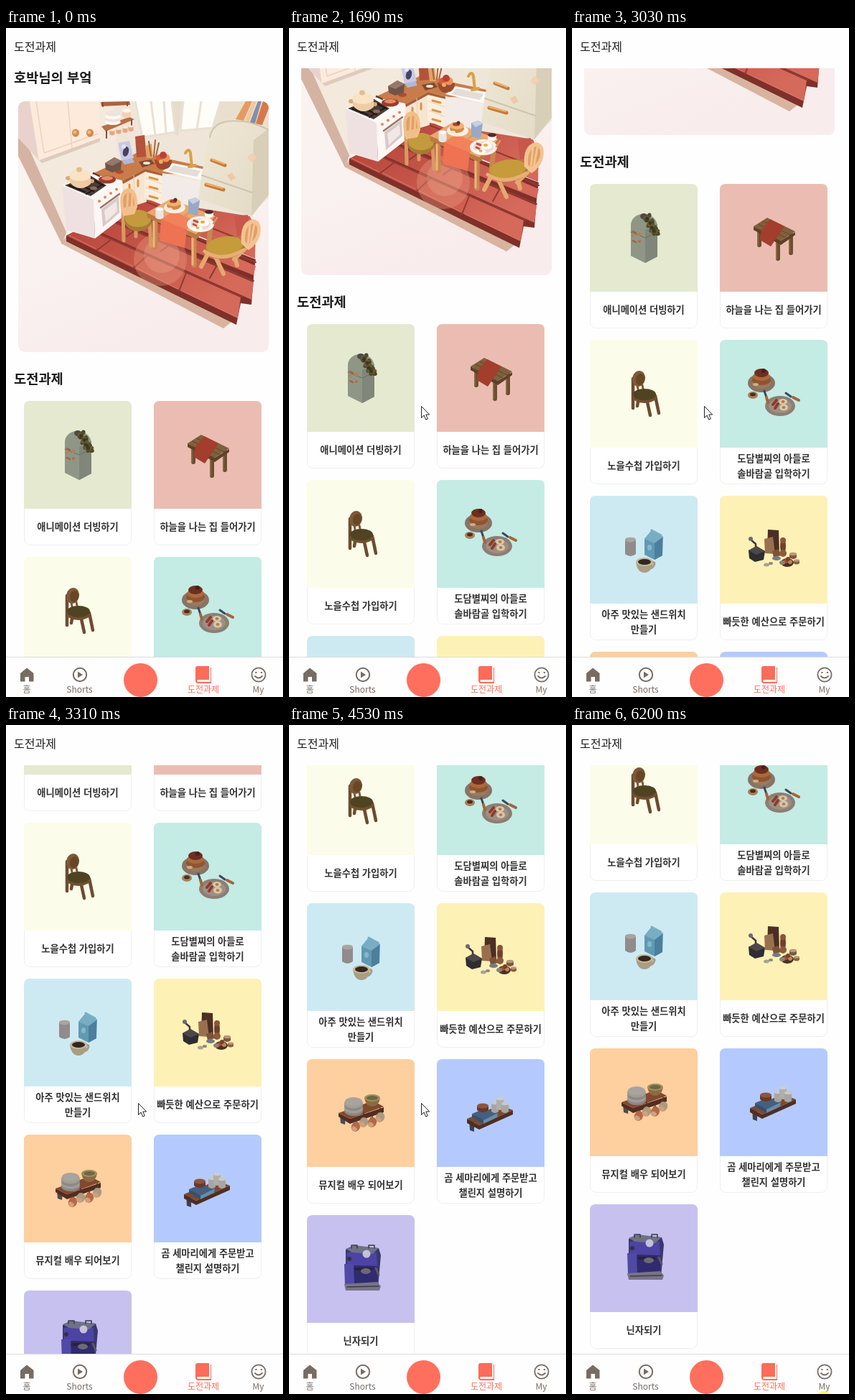
Animation, 386 px wide and 931 px high, one loop 6270 ms. Source, as an HTML page:

```html
<!DOCTYPE html>
<html lang="ko">
<head>
<meta charset="utf-8">
<title>도전과제</title>
<style>
html, body { margin: 0; width: 100%; height: 100%; overflow: hidden; background: #fefefe; }
svg { display: block; width: 386px; height: 931px; }
text { font-family: "Noto Sans CJK KR", "Noto Sans KR", "Noto Sans CJK", "Noto Sans", sans-serif; fill: #1d1d1d; }
.head { font-size: 16px; font-weight: 500; }
.title { font-size: 18.72px; font-weight: 700; }
.label { font-size: 13.28px; font-weight: 600; fill: #333; text-anchor: middle; }
.tab { font-size: 12px; fill: #776c64; text-anchor: middle; }
.tab.on { fill: #fb6c59; }
</style>
</head>
<body>
<svg viewBox="0 0 386 931">
  <defs>
    <clipPath id="view"><rect y="56" width="386" height="819"/></clipPath>
    <clipPath id="photo"><rect x="17" y="102" width="349" height="349" rx="9"/></clipPath>
    <linearGradient id="haze" x2=".4" y2="1">
      <stop stop-color="#fbf3ee"/><stop offset=".6" stop-color="#faf2f0"/><stop offset="1" stop-color="#f8ecec"/>
    </linearGradient>
    <linearGradient id="tile" x2="1" y2=".6"><stop stop-color="#b8463c"/><stop offset="1" stop-color="#d5695a"/></linearGradient>
    <linearGradient id="cool" x2="1" y2="1"><stop stop-color="#efe8d6"/><stop offset="1" stop-color="#e2dac4"/></linearGradient>
  </defs>
  <rect width="386" height="931" fill="#fefefe"/>
  <g clip-path="url(#view)"><g id="page">
    <text class="title" x="11" y="76">호박님의 부엌</text>
    <g id="kitchen" clip-path="url(#photo)"></g>
    <text class="title" x="11" y="495">도전과제</text>
    <g id="cards"></g>
  </g></g>
  <text class="head" x="11" y="32">도전과제</text>
  <g id="nav">
    <path d="M0 875.5H386" stroke="#dcdcdc"/>
    <path d="M20 898l9-7.500 9.500 7.500v11.500h-6.500v-6.500h-5.500v6.500H20z" fill="#776c64"/>
    <circle cx="103" cy="900" r="9.200" fill="none" stroke="#776c64" stroke-width="2"/>
    <path d="M100 895.500v9l7-4.500z" fill="#776c64"/>
    <circle cx="187.500" cy="907.500" r="23.500" fill="#ff6f5e"/>
    <path d="M267 888h16v19h-16q-1.500 1.500 0 3h18v-20h1v22h-19q-3-1-3-4v-17q0-3 3-3z" fill="#fb6c59"/>
    <g fill="none" stroke="#776c64" stroke-width="1.800" stroke-linecap="round">
      <circle cx="352" cy="900" r="9.600"/><path d="M347 902q5 5 10 0M348 897h.8M355.500 897h.8"/>
    </g>
    <text class="tab" x="29" y="925">홈</text>
    <text class="tab" x="102.500" y="925">Shorts</text>
    <text class="tab on" x="275" y="925">도전과제</text>
    <text class="tab" x="351.500" y="925">My</text>
  </g>
  <ellipse id="glow" cx="351" cy="934" rx="9.500" ry="7" fill="#fbf75f" opacity="0"/>
  <path id="cursor" d="M.5 .5v16l3.700-3.500 2.500 6 2.600-1.100-2.500-5.900h4.900z" fill="#fff" stroke="#222" opacity="0"/>
</svg>
<script>
const LOOP = 6270;
const $ = id => document.getElementById(id);

// Shape helpers, all returning SVG markup
const P = (fill, pts) => `<polygon fill="${fill}" points="${pts}"/>`;
const E = (fill, x, y, rx, ry = rx, turn = 0) =>
  `<ellipse fill="${fill}" cx="${x}" cy="${y}" rx="${rx}" ry="${ry}" transform="rotate(${turn} ${x} ${y})"/>`;
const L = (color, width, d) =>
  `<path d="${d}" fill="none" stroke="${color}" stroke-width="${width}" stroke-linecap="round" stroke-linejoin="round"/>`;
const D = (fill, d) => `<path fill="${fill}" d="${d}"/>`;
const cup = (body, top, x, y, r, h) =>
  D(body, `M${x - r} ${y}v${h}q${r} ${r * .8} ${2 * r} 0v${-h}z`) + E(top, x, y, r, r * .45);

const room = () => [
  '<rect x="17" y="102" width="349" height="349" fill="url(#haze)"/>',
  P('#d4b3a2', '17,132 85,282 78,301 17,178'),
  P('#f3e9dc', '17,102 160,102 170,230 84,284 17,134'),
  P('#efe6d9', '150,102 366,102 366,236 330,268 160,240'),
  P('#e6dccb', '232,102 246,102 240,150 232,146'),
  P('#e9dfcd', '300,102 366,102 366,150 282,150'),
  // wall cupboard
  P('#ead2cc', '17,102 33,102 46,184 17,153'),
  P('#fdeadb', '33,102 130,102 131,153 46,184'),
  P('#dfcbbd', '46,184 131,153 131,158 50,188'),
  L('#ead3c2', 1.5, 'M86 102L92 167M42 102L53 174L128 147'),
  E('#d98a47', 97, 146, 5, 5.5), E('#d98a47', 117, 146, 5, 5.5),
  E('#f2b878', 96, 145, 2.5), E('#f2b878', 116, 145, 2.5),
  // windows
  P('#fffdf8', '178,102 231,102 236,144 190,152'),
  P('#fffdf8', '247,102 299,102 288,139 243,143'),
  L('#e9e0d4', 3, 'M202 102L208 149M220 102L223 146M180 102L190 152L236 145L231 102'),
  L('#e9e0d4', 3, 'M272 102L266 141M247 102L243 143L288 139L299 102'),
  // plate shelves
  P('#a9643e', '132,103 172,102 173,107 133,109'),
  P('#b86f45', '133,137 172,124 179,127 139,144'),
  L('#85503a', 2, 'M135 109v-5M140 143v10M175 128v8M169 104v4'),
  [0, 1, 2, 3].map(i => E(i % 2 ? '#f0e2dc' : '#fffaf5', 149, 131 - i * 4, 11, 4)).join(''),
  cup('#f1d0b8', '#fff5ea', 168, 115, 6, 8),
  [148, 157, 166, 174].map(x => cup('#e6a684', '#fbe7d5', x, 142 - (x - 148) / 5, 3.5, 6)).join('')
].join('');

const floor = () => [
  P('#d8b3a0', '77,300 85,288 318,406 303,418'),
  P('#7f3028', '84,289 162,250 348,322 346,335 342,385 327,383 321,413 84,297'),
  P('url(#tile)', '84,289 107,277 327,375 323,404'),
  P('url(#tile)', '111,275 134,264 345,354 342,378'),
  P('url(#tile)', '138,262 161,250 348,331 345,344'),
  P('url(#tile)', '165,248 190,238 340,262 348,280 347,321'),
  L('#913a31', 2, 'M108 277L329 374M135 263L345 352M162 249L348 326M190 240L346 302'),
  L('#913a31', 2, 'M127 309L147 294M178 334L196 317M241 366L251 341'),
  L('#913a31', 2, 'M168 290L185 278M215 311L232 299M284 348L294 330M240 290L262 276M310 318L322 303'),
  L('#d97b69', 1, 'M87 288L125 307M131 309L176 331M182 334L239 363M245 366L321 402'),
  P('#c7584b', '318,262 337,260 341,286 322,290'),
  '<circle cx="215" cy="322" r="37" fill="#ed9d82" opacity=".35"/>',
  '<circle cx="217" cy="316" r="25" fill="#f2b69a" opacity=".25"/>'
].join('');

const units = () => [
  // counter and cabinets
  P('#f6e5d2', '160,212 193,194 196,242 163,252'),
  P('#fbeedd', '193,194 219,202 217,246 193,236'),
  P('#c97b49', '116,205 184,173 280,194 276,204 219,203 194,196 162,213'),
  P('#a85f38', '162,213 194,196 219,203 219,206 194,200 163,217'),
  L('#e5cfb9', 1, 'M178 205L180 246M195 209L217 217M195 222L217 230'),
  L('#dd9547', 3, 'M200 208l11 3M200 221l11 3M200 234l11 3M172 218v8M184 212v8'),
  // sink and tap
  P('#fdf9f5', '218,199 232,188 279,197 272,212'),
  P('#e5dcd7', '226,199 234,191 271,199 266,207'),
  P('#f2ebe7', '218,202 272,213 270,243 217,246'),
  L('#dba045', 4, 'M259 193L257 174Q255 166 250 174M255 193l9-2'),
  // fridge
  D('url(#cool)', 'M272 208L282 154Q286 132 310 128Q338 122 366 138V232L342 262L268 238Z'),
  D('#d8cfb9', 'M345 156L366 140V232L342 262Z'),
  L('#cfc5ae', 2, 'M273 205L343 229M366 142Q338 126 308 130Q288 133 284 152'),
  L('#c87a3a', 5, 'M287 184L305 191M279 218L303 225'),
  L('#f0b165', 2, 'M287 183L304 189M279 217L302 223'),
  P('#f5cfae', '336,181 342,174 349,180 343,187'), P('#f0c9a6', '308,205 315,201 320,209 313,213'),
  // books
  P('#e59a63', '320,127 334,102 343,102 331,129'), P('#f4c79e', '333,129 344,102 349,102 339,131'),
  P('#7f8fae', '340,131 351,102 356,102 347,133'), P('#d9774a', '348,133 358,102 366,102 366,112 357,135'),
  // cooker
  P('#efe1e2', '78,219 122,239 124,293 84,281'),
  P('#fcf6f4', '122,239 162,212 164,262 124,293'),
  P('#fff9f6', '78,219 118,203 162,212 122,239'),
  P('#d8c9c7', '133,252 157,234 158,257 135,277'), P('#f1e7e4', '137,254 154,241 155,255 139,270'),
  L('#9a7563', 2.5, 'M132 250L158 231'),
  [0, 1, 2, 3].map(i => E('#d98b5b', 130 + i * 8, 241 - i * 5.5, 2)).join(''),
  P('#4a3b37', '82,219 117,205 140,219 118,234'),
  L('#1f1917', 2, 'M88 219l22 9M96 215l26 12M112 207l24 12M112 231l22-13M100 225l24-13'),
  E('#8c6c5a', 122, 223, 5, 2.5),
  // pot
  E('#d9ab79', 87, 209, 4, 3), E('#d9ab79', 119, 213, 4, 3),
  D('#efcda4', 'M89 205v10q13 15 29 2v-11z'), E('#f9e3c4', 103, 205, 15, 8), E('#e6bd8e', 102, 197, 4, 3.5),
  // worktop things
  E('#9b3c2d', 141, 211, 12, 5.5), E('#e58b65', 141, 209, 8, 3), L('#5a3c32', 2.5, 'M130 206l-8-4'),
  E('#b04a35', 158, 200, 6, 3),
  P('#6f5548', '138,188 151,180 161,185 160,197 148,201 139,197'), P('#94796a', '138,188 151,180 161,185 148,192'),
  P('#c9c9e4', '156,160 172,157 178,181 161,185'), E('#45435e', 167, 172, 4, 7, 15), E('#e8e2ef', 164, 165, 3),
  P('#aeb9dc', '162,185 176,181 179,187 165,190'),
  P('#b5523c', '180,151 193,149 196,179 182,180'), P('#e0a368', '194,164 203,161 205,181 196,181'),
  L('#a86538', 2, 'M202 178l-3-20M206 178l2-22M209 178l4-18'),
  P('#7f4a31', '185,186 202,183 207,189 190,194'), E('#efe6d6', 196, 188, 5, 2),
  D('#9e4a30', 'M207 183q2 15 12 14q12-1 12-13z'), E('#d85a3c', 214, 181, 5), E('#ee9355', 223, 181, 5.5), E('#b9403a', 219, 177, 5), E('#dfb35b', 216, 186, 3)
].join('');

const dining = () => [
  // left chair
  L('#d89a63', 5, 'M163 254L164 296M181 270L181 290M200 270L202 303'),
  E('#a87a35', 184, 268, 19, 15), E('#c39a3d', 184, 265, 18, 12),
  D('#f2bf8a', 'M160 252Q156 224 171 223Q184 224 183 249L179 259L163 262Z'),
  D('#dfa068', 'M164 250Q161 230 171 229Q179 230 179 247Z'),
  L('#f2bf8a', 3, 'M170 230L168 259M176 232L175 257'),
  // table
  L('#c9864e', 7, 'M208 266L208 305M286 268L282 306M262 290L262 330'),
  L('#eeb57a', 3, 'M206 266L206 304M260 290L260 329'),
  P('#bd7842', '196,257 265,286 291,264 291,270 265,294 197,264'),
  P('#e7a970', '196,257 229,238 292,262 265,287'),
  P('#f3815c', '216,266 233,255 262,267 252,280'), P('#ef7252', '216,266 252,280 249,306 214,296'),
  // breakfast
  E('#fbeee3', 235, 250, 15, 8), E('#d58a45', 234, 247, 10, 6), E('#eeb471', 234, 243, 10, 5),
  E('#a9442e', 233, 241, 5, 2.5), E('#5b3024', 236, 239, 2.5), E('#f8e5d0', 228, 252, 4, 2),
  P('#99a8c7', '254,239 264,236 270,240 267,261 254,258'), P('#c6d0e2', '254,239 264,236 270,240 260,245'),
  cup('#ece4e2', '#fffaf8', 214, 252, 5.5, 12),
  E('#fbf0eb', 271, 273, 19, 11), E('#e9d9d4', 271, 273, 14, 8), E('#fffdf5', 275, 271, 8, 5), E('#f3ad42', 274, 270, 3, 2.2),
  E('#fffdf5', 267, 279, 7, 4), E('#f3ad42', 267, 278, 2.5, 2), L('#c4513c', 3, 'M262 268l5 2M261 273l4 2'),
  cup('#fff5ed', '#4b2f28', 283, 256, 6, 6), L('#e0955f', 2.5, 'M248 262l7-5M289 272l5-8'),
  // right chair
  L('#e5a86e', 6, 'M285 307L272 332M317 312L322 330M288 310L303 342M340 300L318 322'),
  E('#a97b31', 306, 307, 27, 14, -8), E('#c59b3b', 305, 303, 26, 13, -8),
  L('#e8ae76', 5, 'M277 311Q300 327 331 309'),
  D('#f4c391', 'M328 300Q325 270 344 266Q358 268 354 288Q350 302 338 309Z'),
  D('#df9f67', 'M333 297Q332 276 344 272Q353 274 349 288Q345 297 337 302Z'),
  L('#f4c391', 3, 'M340 274L337 302M346 274L341 300')
].join('');

const props = {
  fridge: () => D('#8f9685', 'M57 58Q57 44 75 41Q92 44 94 58V101L77 110L57 100Z')
    + D('#80867a', 'M77 64L94 56V101L77 110Z') + L('#6b7066', 1, 'M57 67L77 75L94 67')
    + L('#a85f3c', 2.5, 'M60 66l4 2M60 79l4 2') + E('#c47a4e', 60, 72, 2) + E('#c47a4e', 69, 70, 2.5) + E('#b56b46', 69, 80, 2)
    + E('#4b4a4c', 75, 45, 5, 4)
    + [...Array(34)].map((_, i) => E(['#4e4c28', '#6a5930', '#3a3824'][i % 3], 78 + i * .46 + 4 * Math.sin(i * 7), 44 + i * .78 + 3 * Math.cos(i * 5), 2.6)).join(''),
  table: () => L('#6c4e31', 6, 'M55 64V85M81 80V104M99 70V96') + L('#8a6742', 2, 'M53 64V85M79 80V104M97 70V96')
    + P('#5d4129', '47,59 85,79 105,67 105,71 85,85 47,64') + P('#80603c', '47,59 66,47 105,66 85,79')
    + L('#5f4630', 1, 'M60 52L98 71M54 56L92 75') + P('#a33d2d', '70,49 90,59 71,87 56,78 58,64'),
  chair: () => L('#6d4b30', 4.5, 'M60 54V95M79 82L84 105M91 78L96 102M68 80L66 92')
    + E('#7d5938', 68, 54, 9, 11, 12) + E('#684727', 70, 55, 6, 8, 12) + L('#7d5938', 3, 'M66 63L68 75M73 63L75 73')
    + E('#71502f', 76, 79, 17, 9) + E('#4f4322', 76, 76, 16, 8),
  meal: () => E('#877467', 58, 60, 19, 13) + E('#9b7a5d', 58, 59, 13, 9) + E('#8f5530', 58, 56, 13, 7) + E('#a96a3e', 58, 51, 12, 6)
    + E('#6e2e20', 58, 46, 10, 6) + E('#45221c', 61, 43, 3) + E('#d3ab83', 50, 62, 4, 2)
    + E('#8c7e73', 84, 92, 21, 14) + E('#9e8f83', 84, 92, 16, 10) + E('#d7c8af', 89, 94, 6, 4.5) + E('#d7c8af', 88, 86, 6, 4)
    + E('#b87f3c', 89, 94, 2.5, 2) + E('#b87f3c', 88, 86, 2.4, 2) + L('#8e3b2c', 4, 'M74 90l5-6M77 95l4-6')
    + E('#a9805a', 46, 77, 7, 5) + E('#4b2e22', 46, 76, 4, 2.5) + L('#3d475b', 3, 'M62 71l3 9M92 74l7 5') + L('#a2653c', 4, 'M65 80l2 7M102 80l8 4'),
  milk: () => cup('#918b8b', '#aaa3a0', 56.500, 61, 7.500, 20)
    + P('#6099b3', '76,60 86,48 102,57 101,83 90,89 76,82') + P('#4c7f9e', '90,65 101,57 101,83 90,89')
    + P('#78adc3', '76,60 86,48 102,57 90,66') + L('#79afc4', 3, 'M86 48L99 55') + E('#88b7c6', 83, 72, 3, 4)
    + L('#aa9d82', 3, 'M86 92q6 0 3 5q-2 4-6 4') + D('#aa9d82', 'M64 92q2 15 12 15t12-15z') + E('#c3b798', 76, 92, 12, 6) + E('#33261f', 76, 92, 9, 4),
  brunch: () => L('#40383a', 2.5, 'M50 76V67L43 61') + E('#6d6a74', 43, 60, 3) + P('#2f2d31', '40,76 51,70 63,77 61,89 49,92 41,87') + P('#4c4849', '40,76 51,70 63,77 51,82')
    + P('#4b2e25', '67,47 82,48 83,80 66,75') + P('#99704e', '62,60 74,57 77,81 63,80') + P('#7b5439', '73,77 82,74 85,83 75,86')
    + E('#70402b', 88, 70, 4, 12) + E('#8b5537', 88, 62, 4) + E('#8e5a3b', 88, 80, 5)
    + E('#4a2f26', 94, 93, 9, 6) + E('#a54b32', 92, 91, 3) + E('#b28b53', 98, 92, 3) + E('#7d3d2b', 95, 88, 3)
    + cup('#7e573d', '#b69a79', 102, 81, 5, 5) + cup('#8f5d3f', '#b69a79', 107, 90, 4, 4)
    + E('#737b87', 79, 87, 6, 3) + E('#8d8272', 87, 93, 4, 3) + E('#aaa393', 65, 96, 4, 2.5) + E('#8f897d', 71, 94, 3, 2),
  rack: () => P('#4b4c59', '46,79 54,81 53,91 47,89') + P('#522d20', '44,75 60,83 107,67 107,74 60,90 44,80')
    + P('#82492f', '44,75 92,58 107,66 60,83')
    + [0, 1, 2, 3].map(i => E(i % 2 ? '#a49c93' : '#8a8988', 65, 72 - i * 3.5, 13, 7)).join('') + E('#a7a39e', 65, 59, 12, 6)
    + D('#8a6a45', 'M80 54q2 12 11 12t11-12z') + E('#a68c55', 91, 54, 11, 5) + E('#656b48', 91, 54, 8, 3)
    + [[68, 94], [79, 88], [91, 88], [102, 81]].map(([x, y], i) => L('#563226', 1.5, `M${x} ${y - 13}v8`) + L('#88543e', 2, `M${x - 2} ${y - 6}q6-1 7 6`)
      + E(i % 2 ? '#aa9c80' : '#b4694a', x, y, 6, 7, 30) + E('#d0a17d', x - 2, y + 3, 4, 3, 30)).join(''),
  shelf: () => P('#3e414d', '45,82 52,86 52,101 46,99') + P('#4f2e22', '42,83 59,92 106,71 106,77 59,98 42,89') + P('#7b4a31', '42,83 88,64 106,71 59,92')
    + P('#445f80', '49,76 66,69 85,75 65,85') + P('#36506e', '49,76 65,85 65,90 49,81') + P('#668caa', '65,85 85,75 84,81 65,90')
    + cup('#6a3827', '#8e563b', 64, 65, 8, 6) + cup('#a7a5a4', '#cbc9c5', 81, 61, 5, 12) + cup('#b0aeab', '#d0ccc7', 88, 55, 5, 14) + cup('#a8a5a3', '#cbc9c5', 95, 62, 5, 11),
  coffee: () => P('#39376d', '54,48 65,43 100,46 103,56 99,101 54,101') + P('#4d43a4', '55,53 65,50 97,52 98,71 56,70')
    + P('#302a70', '65,70 98,71 98,96 65,96') + P('#504aa6', '52,68 65,68 66,97 53,98') + P('#6f7185', '54,47 66,42 100,46 91,54 63,52')
    + L('#363a4b', 1.5, 'M62 46V42h8v4M86 46V42h8v4') + E('#c5c1d8', 83, 54, 5.500) + E('#343144', 59, 61, 3) + L('#27243a', 4, 'M68 75h22') + E('#6c6977', 82, 78, 7, 4)
    + L('#5e5866', 3, 'M96 74l4 9') + P('#777485', '52,96 98,93 103,99 101,105 54,105') + L('#3d3951', 1.5, 'M56 100L100 99')
};

const cards = [
  ['#e4e9d0', 'fridge', '애니메이션 더빙하기'],
  ['#ebbdb2', 'table', '하늘을 나는 집 들어가기'],
  ['#fcfcea', 'chair', '노을수첩 가입하기'],
  ['#c4ebe4', 'meal', '도담별찌의 아들로', '솔바람골 입학하기'],
  ['#cdeaf3', 'milk', '아주 맛있는 샌드위치', '만들기'],
  ['#fef1b6', 'brunch', '빠듯한 예산으로 주문하기'],
  ['#fecf9f', 'rack', '뮤지컬 배우 되어보기'],
  ['#b4caff', 'shelf', '곰 세마리에게 주문받고', '챌린지 설명하기'],
  ['#c7c1ef', 'coffee', '닌자되기']
];

const card = ([color, prop, ...lines], i) => {
  const top = lines.length > 1 ? 169.5 : 180;
  return `<g transform="translate(${25 + i % 2 * 181} ${519 + (i >> 1) * 217})">`
    + '<rect x=".5" y=".5" width="149" height="200" rx="8" fill="#fff" stroke="#eeeeee"/>'
    + D(color, 'M0 150V8Q0 0 8 0H142Q150 0 150 8V150Z') + props[prop]()
    + lines.map((s, n) => `<text class="label" x="75" y="${top + n * 21}">${s}</text>`).join('') + '</g>';
};

$('kitchen').innerHTML = room() + floor() + units() + dining();
$('cards').innerHTML = cards.map(card).join('');

// Each row: start time in ms, then the values held until the next row
const scroll = [
  [0, 0], [870, 24], [940, 82], [1010, 100],
  [1690, 107], [1760, 66 + 100], [1830, 200],
  [2490, 213], [2560, 276], [2630, 300],
  [3030, 302], [3100, 358], [3170, 470], [3240, 566], [3310, 600],
  [3770, 606], [3840, 638], [3910, 676], [3980, 696], [4050, 700],
  [4530, 705], [4590, 714], [4660, 719], [4730, 720]
];
const pointer = [
  [0, 0, 0, 0], [260, 338, 846, 1], [340, 300, 770, 1], [410, 262, 692, 1], [490, 230, 625, 1],
  [570, 207, 576, 1], [640, 193, 546, 1], [720, 186, 531, 1], [790, 184, 526, 1],
  [5330, 194, 552, 1], [5400, 268, 734, 1], [5470, 374, 912, 1], [5540, 0, 0, 0]
];
const glow = [[0, 0], [6200, 1]];

const play = (id, rows, style) => {
  const frames = rows.map(([t, ...v]) => ({ offset: t / LOOP, easing: 'steps(1, end)', ...style(...v) }));
  frames.push({ ...frames[frames.length - 1], offset: 1 });
  $(id).animate(frames, { duration: LOOP, iterations: Infinity });
};

play('page', scroll, y => ({ transform: `translate(0px, ${-y}px)` }));
play('cursor', pointer, (x, y, opacity) => ({ transform: `translate(${x}px, ${y}px)`, opacity }));
play('glow', glow, opacity => ({ opacity }));
</script>
</body>
</html>
```
